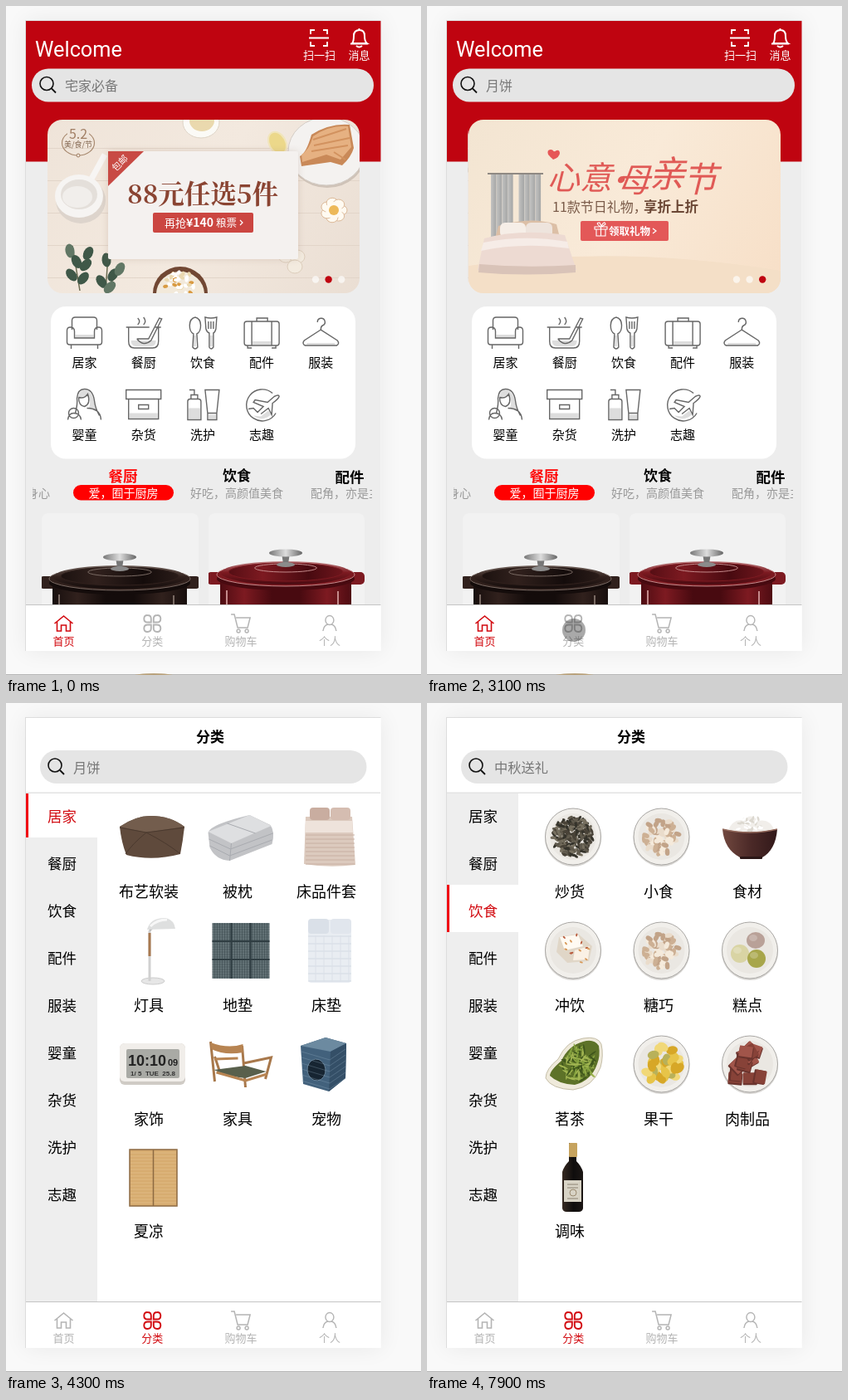
An HTML page with a canvas that plays this animation: 500x806 px, repeating every 8 s.

```html
<!DOCTYPE html>
<html lang="zh-CN">
<head>
<meta charset="utf-8">
<style>
html, body { margin: 0; width: 100%; height: 100%; overflow: hidden; background: #f9f9f9; }
canvas { display: block; }
</style>
</head>
<body>
<canvas id="stage" width="500" height="806"></canvas>
<script>
const ctx = document.getElementById('stage').getContext('2d');
const RED = '#bf0410', LOOP = 8000;
const SANS = '"Noto Sans CJK SC", "Noto Sans CJK", sans-serif';
const SERIF = '"Noto Serif CJK SC", "Noto Serif", "Noto Sans CJK SC", serif';

// ---------- helpers ----------
function box(x, y, w, h, fill, r = 0) {
  ctx.fillStyle = fill;
  ctx.beginPath();
  ctx.roundRect(x, y, w, h, r);
  ctx.fill();
}
function oval(x, y, rx, ry, fill, stroke, w = 1, turn = 0) {
  ctx.beginPath();
  ctx.ellipse(x, y, rx, ry, turn, 0, 7);
  if (fill) { ctx.fillStyle = fill; ctx.fill(); }
  if (stroke) { ctx.strokeStyle = stroke; ctx.lineWidth = w; ctx.stroke(); }
}
function path(d, fill, stroke, w = 1) {
  const p = new Path2D(d);
  if (fill) { ctx.fillStyle = fill; ctx.fill(p); }
  if (stroke) { ctx.strokeStyle = stroke; ctx.lineWidth = w; ctx.stroke(p); }
}
function text(s, x, y, size, color = '#000', { align = 'center', weight = 300, font = SANS, style = '' } = {}) {
  ctx.font = `${style} ${weight} ${size}px ${font}`;
  ctx.textAlign = align;
  ctx.fillStyle = color;
  ctx.fillText(s, x, y + size * 0.38);
}
function at(x, y, draw, turn = 0) {
  ctx.save();
  ctx.translate(x, y);
  ctx.rotate(turn);
  draw();
  ctx.restore();
}
function clipped(x, y, w, h, r, draw) {
  ctx.save();
  ctx.beginPath();
  ctx.roundRect(x, y, w, h, r);
  ctx.clip();
  draw();
  ctx.restore();
}
function shade(x0, y0, x1, y1, ...colors) {
  const g = ctx.createLinearGradient(x0, y0, x1, y1);
  colors.forEach((c, i) => g.addColorStop(i / (colors.length - 1), c));
  return g;
}
function random(seed) {
  return () => (seed = seed * 16807 % 2147483647) / 2147483647;
}
function heap(radius, count, rx, ry, colors, seed = 77) {
  const rnd = random(seed);
  for (let i = 0; i < count; i++) {
    const a = rnd() * 6.28, d = Math.sqrt(rnd()) * radius;
    oval(Math.cos(a) * d, Math.sin(a) * d, rx, ry, colors[i % colors.length], null, 1, rnd() * 3);
  }
}
function bezier(t, x1, y1, x2, y2) {
  const curve = (u, a, b) => 3 * u * (1 - u) ** 2 * a + 3 * u * u * (1 - u) * b + u ** 3;
  let lo = 0, hi = 1;
  for (let i = 0; i < 24; i++) {
    const mid = (lo + hi) / 2;
    if (curve(mid, x1, x2) < t) lo = mid; else hi = mid;
  }
  return curve(lo, y1, y2);
}
const clamp = v => Math.max(0, Math.min(1, v));

// ---------- shared chrome ----------
function phone() {
  box(0, 0, 500, 806, '#f9f9f9');
  ctx.save();
  ctx.shadowColor = 'rgba(0,0,0,.07)';
  ctx.shadowBlur = 26;
  box(24, 18, 427.5, 759, '#fff');
  ctx.restore();
  box(23, 17, 428.5, 1, '#ddd');
  box(23, 18, 1, 759, '#ddd');
  box(0, 805, 500, 1, '#b5b5b5');
}
const navIcons = [
  c => path('M-11 0L0-9 11 0M-8-2V9H-3V2H3V9H8V-2', null, c, 1.6),
  c => [[-1, -1], [1, -1], [-1, 1], [1, 1]].forEach(([i, j]) =>
    path(`M${i * 1.5} ${j * 1.5}H${i * 5.5}Q${i * 10} ${j * 1.5} ${i * 10} ${j * 5.8}T${i * 5.8} ${j * 10}Q${i * 1.5} ${j * 10} ${i * 1.5} ${j * 5.8}z`, null, c, 1.9)),
  c => {
    path('M-12-11h4l4 16H8L11-7H-6', null, c, 1.5);
    oval(-3, 9, 2, 2, null, c, 1.4);
    oval(7, 9, 2, 2, null, c, 1.4);
  },
  c => {
    oval(0, -4, 5, 5.5, null, c, 1.4);
    path('M-8 9Q-7 2-2 1M2 1Q7 2 8 9', null, c, 1.4);
  }
];
function nav(active) {
  box(24, 721, 427.5, 56, '#fff');
  box(24, 721, 427.5, 1, '#c4c4c4');
  ['首页', '分类', '购物车', '个人'].forEach((label, i) => {
    const x = 69.5 + i * 106.8, c = i === active ? '#d20a10' : '#b4b4b4';
    at(x, 744, () => navIcons[i](c));
    text(label, x, 765, 13, c);
  });
}
function magnifier(x, y) {
  oval(x, y, 8, 8, null, '#111', 1.6);
  path(`M${x + 6} ${y + 6}l5 5`, null, '#111', 1.8);
}
function touch(x, y) {
  oval(x, y, 14, 14, 'rgba(50,50,50,.42)');
}

// ---------- banners, 376 x 209 ----------
function foodBanner() {
  box(0, 0, 376, 209, shade(0, 0, 376, 209, '#efe4d9', '#f3e9df', '#eaded3'));
  for (let y = 34; y < 209; y += 39) box(0, y, 376, 1, '#e2d5c9');
  // table ware
  oval(40, 97, 30, 28, '#ddd4cc');
  path('M46 84L69 42', null, '#f7f5f3', 7);
  oval(38, 92, 29, 26, '#f6f4f2');
  oval(38, 90, 22, 18, '#e4dfda');
  oval(36, 93, 18, 13, '#f1eeeb');
  oval(185, 3, 22, 19, '#fbfaf6', '#ddd3c5');
  oval(186, 1, 15, 13, '#ead9ae');
  oval(277, 28, 10, 14, '#ecd88a', '#f1e5bb', 2, -0.5);
  // bread
  oval(337, 41, 46, 41, '#cfc3b8');
  oval(336, 38, 46, 41, '#f4f2f0', '#d3ccc5');
  path('M304 44Q312 40 318 18 340 4 364 6L369 34Q366 45 355 55L341 51 306 56Z', '#c98958');
  path('M306 42Q315 37 320 20 340 6 362 8L366 33 353 48 336 42 307 51Z', '#e6b182');
  path('M320 24l40-13M321 31l43-9M318 38l44-7M345 39l14 9', null, '#d2925f', 2);
  at(345, 109, () => {
    for (let i = 0; i < 7; i++) oval(Math.cos(i * 0.9) * 9, Math.sin(i * 0.9) * 9, 7, 6, '#fffaf1', '#dcb998');
    oval(0, 0, 10, 10, '#fffaf1');
    oval(0, 0, 6, 6, '#edb959');
  });
  [[287, 164], [301, 165], [298, 177]].forEach(([x, y]) => oval(x, y, 9, 8, '#f3ebdf', '#dccdbb'));
  // leaves
  path('M30 152L39 206M73 164L70 206M70 206L86 182', null, '#6a6b50', 1.5);
  [[27, 158, -.2], [49, 161, .5], [35, 171, -.5], [46, 175, .8], [29, 187, -.7], [43, 191, .7], [71, 169, -.1], [79, 187, .6], [65, 195, -.6], [87, 180, .5], [75, 202, .8]]
    .forEach(([x, y, a]) => oval(x, y, 5.5, 8.5, y % 2 ? '#3f5848' : '#617765', null, 1, a));
  oval(160, 209, 33, 32, '#714733');
  oval(160, 210, 29, 27, '#f2e9da');
  at(160, 200, () => heap(18, 40, 3, 2, ['#fff', '#ead8b0', '#d99b42', '#fff']));
  // offer card
  ctx.save();
  ctx.shadowColor = 'rgba(150,120,100,.25)';
  ctx.shadowBlur = 8;
  box(73, 38, 229, 130, '#f4f1ef', 2);
  ctx.restore();
  path('M73 38h43L73 80Z', '#c84a44');
  at(87, 52, () => text('包邮', 0, 0, 11, '#fff', { weight: 400 }), -Math.PI / 4);
  text('88元任选5件', 187, 89, 31.5, '#8a4432', { weight: 700, font: SERIF });
  box(127, 112, 121, 24, '#cb4641', 2);
  text('再抢', 141, 124, 13, '#fff', { align: 'left', weight: 500 });
  text('¥140', 167, 124, 14, '#fff', { align: 'left', weight: 700 });
  text('粮票', 203, 124, 12.5, '#fff', { align: 'left', weight: 500 });
  path('M232 121l3 3-3 3', null, '#fff', 1.2);
  // badge
  oval(37, 28, 19.5, 15, null, '#a88a70', 1.2);
  box(24, 8, 26, 17, '#efe5db');
  text('5.2', 37, 17, 16, '#a07d62');
  text('美/食/节', 37, 30, 9, '#80644e', { weight: 500 });
  oval(37, 43, 2, 2, '#efe5db', '#a07d62');
}
function giftBanner() {
  box(0, 0, 376, 209, shade(0, 0, 376, 209, '#f3e5d2', '#f9ead8', '#f7dfc7'));
  path('M0 209V176Q180 150 376 182V209Z', '#f4dfc7');
  oval(102, 42, 4, 4, '#e65757');
  path('M96 42q-2-6 3-6 3 0 4 3 6-5 7 1 0 5-8 8z', '#e65757');
  path('M23 65H90', null, '#8f8983', 2);
  for (let i = 0; i < 9; i++) {
    if (i !== 4) box(27 + i * 6.7, 66, 6.5, 91, shade(27 + i * 6.7, 0, 34 + i * 6.7, 0, '#c3c3c2', '#a2a3a3'));
  }
  // bed
  path('M36 128q38-12 70-2l8 32H28z', '#dcbfa6');
  box(38, 124, 31, 18, '#f6eee7', 6);
  box(69, 124, 32, 18, '#eee4dd', 6);
  path('M19 143Q63 131 116 139L130 181Q75 190 11 181Z', '#eddad2');
  path('M18 148Q67 138 119 147L121 155Q64 147 15 158Z', '#f6ece7');
  path('M13 174Q70 179 129 175V184Q70 189 12 184Z', '#d9c3b8');
  // copy
  const brush = { weight: 500, style: 'italic', align: 'left' };
  text('心意', 95, 69, 39, '#e05a56', brush);
  text('·', 161, 72, 39, '#e05a56', brush);
  text('母', 179, 72, 40, '#e05a56', brush);
  text('亲', 217, 64, 44, '#e05a56', brush);
  text('节', 258, 71, 42, '#e05a56', brush);
  text('11款节日礼物，', 101, 105, 16, '#795a48', { align: 'left', weight: 400 });
  text('享折上折', 211, 105, 16.5, '#6b4735', { align: 'left', weight: 700 });
  box(135, 122, 106, 24, '#e35858', 2);
  path('M154 132h11v8h-11zM152 129h15v3h-15zM159.5 129v11M159 129q-7-5-1-5l2 4q4-7 5-2l-5 3', null, '#fff', 1.1);
  text('领取礼物', 169, 134, 12.5, '#fff', { align: 'left', weight: 700 });
  path('M222 131l4 3-4 3', null, '#fff', 1.2);
}

// ---------- home ----------
const homeIcons = [
  ['居家', 'M-15-4V-15q0-4 4-4h22q4 0 4 4V-4M-21-3q0-4 4-4 5 0 5 5v8h24v-8q0-5 5-5 4 0 4 4v14q0 3-3 3h-36q-3 0-3-3zM-16 14v5M16 14v5', 'M-11 2h22v4h-22z'],
  ['餐厨', 'M-21-7h28M14-7h7M-18-7v17q0 8 7 8h22q7 0 7-8v-17M-8 7h14l13-25 3 1-13 26q-9 8-17-2M-7-10q4-4 0-8M0-10q4-4 0-9', 'M-15 9h30q0 7-6 7h-18q-6 0-6-7z'],
  ['饮食', 'M-9-19c-9 2-8 17-2 20l-1 16q3 4 6 0l-1-16c6-3 7-18-2-20M3-19q7 2 14 0l-1 14q-1 4-3 5v17q-3 4-5 0v-17q-3-1-4-5zM7-14v9M10-14v9M13-14v9', 'M-11 3h3v13h-3zM9 3h3v13h-3z'],
  ['配件', 'M-18-14h36q3 0 3 3v23q0 3-3 3h-36q-3 0-3-3v-23q0-3 3-3M-6-14v-4h13v4M-12-14v29M12-14v29M-17 15v3h5M17 15v3h-5', 'M-11 10h22v4h-22z'],
  ['服装', 'M-4-13a4.5 4.5 0 1 1 6 4q-2 1-2 5L20 9q3 4-1 6h-38q-4-2-1-6L0-4', 'M-17 12h34v2h-34z'],
  ['婴童', 'M-11 10Q-8-1-9-8q1-11 9-11 10 0 12 14 1 9 6 18M-7-9Q0-7 4-13 8-1 0 2-7 1-7-9M-20 18q1-8 7-8 8 0 9 8M-7 10a6 6 0 1 0-12 0 6 6 0 0 0 12 0M3 4q16 0 17 14', 'M-8-8Q-6-19 1-18 11-17 14 8L5 4Q9-3 4-12z'],
  ['杂货', 'M-21-18h42v11h-42zM-18-7v24h36v-24M-6 0h12v5h-12z', 'M-17 10h34v6h-34z'],
  ['洗护', 'M-18-4q0-3 3-3h10q3 0 3 3v22h-16zM-14-7v-5h8v5M-10-12v-6h-6M3-18h17l-3 28h-11zM6 10h11v8h-11z', 'M-17 4h14v13h-14zM7 12h9v5h-9z'],
  ['志趣', 'M13-14a19 19 0 1 0 4 24M-16 5L-10 4-5 9 2 2-10-3-8-6 7-3 15-10q6-3 6 0-1 3-8 8l-1 14-4-8-9 7', 'M-10 13q10 8 21-1l-3-5-9 7z']
];
function pot(x, y, rx, dark, mid, glint) {
  const left = x - rx, right = x + rx;
  box(left - 12, y + 1, 24, 15, mid, 5);
  box(right - 12, y + 1, 24, 15, mid, 5);
  box(left + 4, y + 10, rx * 2 - 8, 50, shade(left, 0, right, 0, dark, mid, dark, dark, mid, dark));
  oval(x, y + 9, rx, 14, dark);
  oval(x, y + 4, rx, 14, mid, glint, 1);
  oval(x, y + 2, rx - 5, 14, shade(0, y - 13, 0, y + 16, glint, mid, dark));
  oval(x, y + 1, rx - 14, 11, shade(left, 0, right, 0, dark, mid, dark, mid), mid);
  oval(x, y - 4, rx * 0.45, 5, null, glint, 1);
  path(`M${left + 12} ${y + 23}v28M${right - 20} ${y + 24}v28`, null, glint, 2);
  path(`M${x - 5} ${y - 22}h10l-2 13h-6z`, '#777');
  oval(x, y - 8, 11, 3, '#8b8b8b');
  oval(x, y - 22, 20, 4.5, shade(x - 20, 0, x + 20, 0, '#777', '#ddd', '#666'));
}
function home(ms) {
  box(24, 18, 427.5, 703, '#ededed');
  box(24, 18, 427.5, 169.5, RED);
  oval(178, 807, 24, 3, '#b9a27c');
  text('Welcome', 35, 51.5, 25.3, '#fff', { align: 'left', weight: 400, font: 'Roboto, sans-serif' });
  path('M367 34v-5h5M382 29h5v5M387 43v5h-5M372 48h-5v-5M365 38.5h24', null, '#fff', 1.8);
  path('M417 45q2-2 2-9 0-7 7-7 6 0 6 7 0 7 3 9zM415 45.5h21M425.5 27v2', null, '#fff', 2);
  path('M422 48q3.500 3 7 0', null, '#fff', 2);
  text('扫一扫', 377.5, 59, 13, '#fff', { weight: 400 });
  text('消息', 425.5, 59, 13, '#fff', { weight: 400 });
  box(31, 75.5, 412, 40, '#e5e5e5', 20);
  magnifier(49, 93.5);
  text(ms < 1500 ? '宅家必备' : '月饼', 71, 96, 16, '#777', { align: 'left' });

  const shift = 376 * bezier(clamp((ms - 2375) / 500), 0.25, 0.1, 0.25, 1);
  clipped(49.5, 137, 376.5, 209, 0, () => {
    [foodBanner, giftBanner].forEach((banner, i) => {
      const x = 50 + i * 376 - shift;
      if (x > -326 && x < 426) at(x, 137, () => clipped(0, 0, 376, 209, 18, banner));
    });
  });
  const active = ms < 2400 ? 1 : 2;
  for (let i = 0; i < 3; i++) oval(373 + i * 15.6, 329.5, 4.2, 4.2, i === active ? RED : 'rgba(255,255,255,.65)');

  box(54, 362, 367, 183.5, '#fff', 18);
  homeIcons.forEach(([label, outline, accent], i) => {
    const x = 94.5 + i % 5 * 71.2, y = i < 5 ? 394 : 480.5;
    at(x, y, () => { path(accent, '#ddd'); path(outline, null, '#666', 1.4); });
    text(label, x, i < 5 ? 429 : 516, 15, '#000', { weight: 400 });
  });

  text('餐厨', 141, 566, 17.5, '#f00', { weight: 700 });
  text('饮食', 278, 566, 17, '#000', { weight: 700 });
  text('配件', 414, 567, 17.5, '#000', { weight: 700 });
  box(81, 577, 121, 18.5, '#f00', 9.5);
  clipped(32, 575, 409, 25, 0, () => {
    text('身心', 53, 587, 14, '#999', { align: 'right' });
    text('爱，囿于厨房', 141.5, 587, 14, '#fff');
    text('好吃，高颜值美食', 278, 587, 14, '#999');
    text('配角，亦是主角', 367, 587, 14, '#999', { align: 'left' });
  });
  clipped(43, 611, 189, 130, 8, () => {
    box(43, 611, 189, 130, '#f2f2f2');
    pot(137, 686, 85, '#140c0b', '#31211d', '#796a63');
  });
  clipped(244, 611, 188, 130, 8, () => {
    box(244, 611, 188, 130, '#f2f2f2');
    pot(337, 681, 83, '#480a10', '#7d1a21', '#c48a8b');
  });
}

// ---------- category goods, centred on 0,0 ----------
const furnishings = [
  ['布艺软装', () => {
    path('M-39-12Q-20-25-2-25 22-25 39-12 37 6 34 21 0 30-31 22-37 7-39-12Z', '#5f4a3c');
    path('M-39-12Q-20-25-2-25 22-25 39-12L-7-5Z', '#735d4d');
    path('M-39-11L-7-5 39-11M-7-5Q-24 9-32 21M-7-5Q18 8 33 20', null, '#4a392e');
  }],
  ['被枕', () => {
    path('M-39-5Q-36-15 11-26L36-14Q42-6 38 9L-13 29Q-30 28-37 13Z', '#c2c3c6');
    path('M-39-6L11-26 37-13-11 8Z', '#dedfe1');
    path('M-38 3L-12 15 39-4M-37 11L-13 23 38 4M-11 8L-13 29M-16-16L18-4', null, '#a9abb0');
  }],
  ['床品件套', () => {
    path('M-28-24h56l4 58q-32 4-62-1z', '#dccabe');
    box(-23, -35, 24, 15, '#c9ada0', 4);
    box(2, -35, 24, 15, '#d5bdb1', 4);
    path('M-28-19h56l1 14h-58z', '#eee3db');
    for (let y = -2; y < 34; y += 5) path(`M-28 ${y}h59`, null, '#c8afa2');
  }],
  ['灯具', () => {
    oval(1, 37, 14, 4, '#e6e6e6', '#ccc');
    path('M-3 37V-24', null, '#d1d1d1', 3);
    path('M-3 7V-21', null, '#a87950', 3);
    path('M-3-24L9-36', null, '#bbb', 3);
    path('M-6-25Q-2-40 17-39 27-36 28-26Z', '#dedfdf');
    path('M-2-29Q6-37 18-37', null, '#f7f7f7', 3);
  }],
  ['地垫', () => {
    box(-34, -33, 69, 67, '#667579');
    for (let i = 1; i < 23; i++) path(`M-34 ${i * 3 - 34}h69M${i * 3 - 34}-33v67`, null, 'rgba(30,45,50,.3)', 1);
    path('M-11-33v67M12-33v67M-34-11h69M-34 11h69', null, '#2f3d42', 2);
  }],
  ['床垫', () => {
    box(-25, -37, 52, 76, '#e9edf2', 4);
    box(-25, -38, 25, 18, '#dae0e8', 4);
    box(2, -38, 25, 18, '#e1e6ed', 4);
    for (let i = -17; i < 38; i += 9) path(`M-25 ${i}h52`, null, '#d3dae3');
    for (let i = -16; i < 27; i += 10) path(`M${i}-18v56`, null, '#dbe0e8');
  }],
  ['家饰', () => {
    box(-39, -25, 79, 50, '#cfcbc5', 6);
    box(-39, -25, 79, 46, '#f1eeea', 6);
    box(-31, -18, 64, 35, '#a9aaa5', 2);
    const digits = { weight: 700, font: '"Liberation Sans", sans-serif' };
    text('10:10', -6, -5, 18, '#222', digits);
    text('09', 25, -2, 11, '#222', digits);
    text('1/ 5  TUE  25.8', 1, 11, 8, '#333', digits);
  }],
  ['家具', () => {
    path('M-36-27L-31 21M2-22L6 28M-31-9L-25 9M4-1L37-8 30 18', null, '#a8784b', 3);
    path('M-36-26Q-15-18 3-24V-14Q-19-10-35-18Z', '#b78452');
    path('M-32 7L6 2 31 9 6 17Q-15 15-32 7Z', '#59604c');
    path('M-31-6L-3-7M-29 10L6 20 32 12', null, '#b78452', 3);
  }],
  ['宠物', () => {
    path('M-34-22L-4-32 21-25 20 17 0 33-31 24Z', '#42617c');
    path('M-34-22L-4-32 21-25 2-15Z', '#6c8aa0');
    path('M2-15L21-25 20 17 0 33Z', '#344f67');
    oval(-15, 7, 11, 13, '#172532', '#67839a', 1, -0.1);
    for (let y = -10; y < 27; y += 7) path(`M-33 ${y - 5}L1 ${y + 5} 20 ${y - 8}`, null, 'rgba(150,175,195,.3)');
  }],
  ['夏凉', () => {
    box(-27, -34, 57, 68, '#d7ac70', 2);
    for (let y = -30; y < 34; y += 4) path(`M-26 ${y}h55`, null, '#e0ba83');
    path('M-27-34h57v68h-57zM1.5-34v68', null, '#8d6a42', 1.5);
  }]
];
function plate() {
  oval(0, 2, 34, 34, '#d8d6d3');
  oval(0, 0, 33.5, 34, '#f1efeb', '#a9a7a4', 1);
  oval(0, 0, 28, 28, '#eae7e2');
}
const onPlate = (...args) => () => { plate(); heap(...args); };
const nuts = onPlate(21, 75, 4.5, 2.8, ['#eadccb', '#cdb094', '#f5eadb', '#c2a388'], 31);
const foods = [
  ['炒货', onPlate(24, 260, 3.5, 1.6, ['#35332b', '#605a4d', '#494338', '#777060'])],
  ['小食', nuts],
  ['食材', () => {
    path('M-27-6Q-20-23-7-19 0-30 10-19 25-22 30-6Z', '#f1eeea');
    at(1, -10, () => heap(15, 30, 3, 1.3, ['#fff', '#dcd8d0']));
    path('M-33-9Q0-2 33-9 31 16 15 25H-12Q-31 15-33-9Z', shade(-33, 0, 33, 0, '#71483f', '#4c2a28', '#32191a'));
    path('M-33-9Q0-1 33-9', null, '#93695c', 1.5);
    box(-12, 24, 27, 3, '#2b1717', 1);
  }],
  ['冲饮', () => {
    plate();
    path('M-17-16L6-20 23-5 19 13-7 15-20 2Z', '#e0d6c7');
    path('M-16-16L6-19 12-5-10 0Z', '#fffaf2');
    path('M2 0L20-5 18 11 0 12Z', '#faf1e5');
    heap(23, 13, 2, 1, ['#d79756', '#b95c3e']);
  }],
  ['糖巧', nuts],
  ['糕点', () => {
    plate();
    oval(7, -12, 11, 10, '#b9a198');
    oval(-12, 4, 11, 11, '#d9d4a4');
    oval(8, 10, 11, 11, '#a8a64b');
    [[4, -15], [-15, 0], [5, 6]].forEach(([x, y]) => oval(x, y, 5, 4, 'rgba(255,255,255,.22)'));
  }],
  ['茗茶', () => {
    path('M34-24Q30-34 12-31-8-28-18-6-33 6-33 17-26 30 0 31 24 28 33 4 37-10 34-24Z', '#efeadb', '#c5bea8');
    path('M31-22Q25-31 12-27-6-22-14-4-28 8-28 14-18 24 2 25 22 20 29 0 33-10 31-22Z', '#5d7228');
    at(7, 0, () => heap(20, 90, 6, 1, ['#87a340', '#3f561c', '#a3b653'], 17));
  }],
  ['果干', onPlate(22, 34, 7, 5, ['#e7c449', '#d7a727', '#f1d878', '#b8b15a'], 29)],
  ['肉制品', () => {
    plate();
    const rnd = random(53);
    for (let i = 0; i < 14; i++) {
      at(rnd() * 36 - 18, rnd() * 36 - 18, () => {
        box(-8, -6, 17, 14, '#69332d', 1);
        box(-8, -7, 16, 13, i % 2 ? '#a1554a' : '#874238', 1);
      }, rnd() * 2);
    }
  }],
  ['调味', () => {
    path('M-5-42h9v22q6 6 8 13V37q-1 4-5 4h-15q-4 0-5-4V-7q2-7 8-13z', shade(-12, 0, 13, 0, '#33271f', '#0f0d0d', '#1d1715'));
    box(-5, -42, 10, 17, '#c6a35e', 1);
    box(-11, 3, 21, 26, '#d8d3c5');
    path('M-7 8h13M-7 12h13M-7 25h13', null, '#8c8272');
    oval(0, 18, 4, 4, null, '#9b8a70');
  }]
];

// ---------- category page ----------
function category(ms) {
  const loaded = ms >= 3800, chosen = ms < 7000 ? 0 : 2;
  const hint = ms < 4500 ? '月饼' : ms < 7500 ? '宅家必备' : '中秋送礼';
  box(24, 18, 427.5, 703, '#fff');
  text('分类', 246, 41, 17, '#000', { weight: 700 });
  box(41, 57, 393.5, 40, '#e5e5e5', 20);
  if (loaded) magnifier(59, 75);
  text(hint, loaded ? 81 : 60, 77.5, 16.3, '#777', { align: 'left' });
  box(24, 107.5, 427, 1.5, '#e3e3e3');
  box(24, 109, 86, 612, '#eee');
  const top = Math.max(109, 105 + chosen * 57);
  box(24, top, 86, 162 + chosen * 57 - top, '#fff');
  box(24, top, 3, 162 + chosen * 57 - top, '#f00610');

  if (loaded) {
    homeIcons.forEach(([label], i) =>
      text(label, 67.5, 136 + i * 57, 17.5, i === chosen ? '#d20a10' : '#000', { weight: i === 2 ? 400 : 300 }));
    (chosen ? foods : furnishings).forEach(([label, draw], i) => {
      const col = i % 3, row = Math.floor(i / 3);
      const shownAt = chosen ? (i < 2 ? 7100 : 7300 + Math.floor((i - 2) / 2) * 100) : 3900 + row * 100;
      if (ms >= shownAt) at(176 + col * 106.5, 161 + row * 137, draw);
      text(label, 172 + col * 107, row < 3 ? 227 + row * 137 : 636, 18);
    });
  }
  const bar = 1 - clamp((ms - 3800) / 400);
  if (bar > 0) box(443.5, 23, 2.5, 741, `rgba(170,170,170,${0.85 * bar})`, 1);
}

function render(ms) {
  phone();
  const onHome = ms < 3400;
  if (onHome) home(ms); else category(ms);
  nav(onHome ? 0 : 1);
  if (ms >= 3100 && ms < 3600) touch(177, 752);
  if (ms >= 4900 && ms < 5300) {
    const k = clamp((ms - 4900) / 300);
    touch(96 - 14 * k, 351 - 104 * k);
  }
  if (ms >= 5900 && ms < 6100) touch(70.5, 254.5);
}

const start = performance.now();
function tick() {
  render((performance.now() - start) % LOOP);
  requestAnimationFrame(tick);
}
tick();
</script>
</body>
</html>
```
